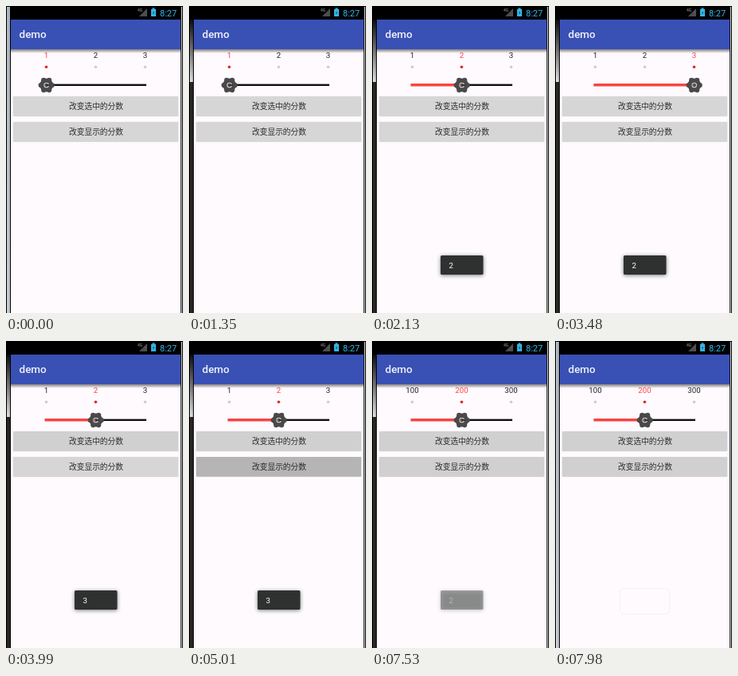
An HTML page with a canvas that plays this animation: 222 px wide and 384 px high, repeating every 8040 ms.

```html
<!DOCTYPE html>
<html lang="zh">
<head>
<meta charset="utf-8">
<title>demo</title>
<style>
html, body { margin: 0; width: 100%; height: 100%; overflow: hidden; background: #000; }
canvas { display: block; width: 222px; height: 384px; }
</style>
</head>
<body>
<canvas></canvas>
<script>
const LOOP = 8040, STEP = 30;
const STOPS = [50.5, 112.5, 174.5];
const RED = '#fa4444';
const LATIN = 'Roboto, sans-serif';
const CJK = '"Noto Sans CJK SC", "Noto Sans CJK", sans-serif';

const canvas = document.querySelector('canvas');
const ctx = canvas.getContext('2d');
const ratio = window.devicePixelRatio || 1;
canvas.width = 222 * ratio;
canvas.height = 384 * ratio;
ctx.scale(ratio, ratio);

const between = (t, a, b) => t >= a && t < b;
const progress = (t, a, b) => Math.min(1, Math.max(0, (t - a) / (b - a)));
const smooth = p => p * p * (3 - 2 * p);

function rect(x, y, w, h, color) {
  ctx.fillStyle = color;
  ctx.fillRect(x, y, w, h);
}

function fade(x, y, w, h, top, bottom) {
  const gradient = ctx.createLinearGradient(0, y, 0, y + h);
  gradient.addColorStop(0, top);
  gradient.addColorStop(1, bottom);
  rect(x, y, w, h, gradient);
}

function disc(x, y, r, color) {
  ctx.fillStyle = color;
  ctx.beginPath();
  ctx.arc(x, y, r, 0, Math.PI * 2);
  ctx.fill();
}

function rounded(x, y, w, h, r) {
  ctx.beginPath();
  ctx.roundRect(x, y, w, h, r);
}

function text(str, x, y, font, color, align = 'center') {
  ctx.font = font;
  ctx.fillStyle = color;
  ctx.textAlign = align;
  ctx.fillText(str, x, y);
}

function polygon(points, color) {
  ctx.fillStyle = color;
  ctx.beginPath();
  points.forEach(([x, y]) => ctx.lineTo(x, y));
  ctx.fill();
}

function drawStatusBar(t) {
  rect(5, 1, 215, 16, '#000');
  polygon([[177, 3], [177, 13], [167, 13]], '#4c4c4c');
  text('4G', 165, 7, `5px ${LATIN}`, '#a5a5a5', 'left');
  if (between(t, 120, 750) || t >= 3480) rect(174, 7, 2, 2, '#585858');
  rect(183.5, 2.5, 3, 1.5, '#33b5e5');
  rect(182, 4, 6, 9, '#33b5e5');
  polygon([[185.5, 6], [183.8, 9], [184.8, 9], [184.5, 11], [186.4, 8], [185.3, 8]], '#165468');
  text('8:27', 193, 12.5, `11px ${LATIN}`, '#33b5e5', 'left');
}

function drawAppBar() {
  fade(5, 54, 215, 5, 'rgba(0,0,0,.5)', 'rgba(0,0,0,0)');
  rect(5, 17, 215, 37, '#3950b4');
  text('demo', 16.5, 40, `500 13.5px ${LATIN}`, '#f0f1fa', 'left');
}

function drawEdges(t) {
  rect(0, 0, 222, 1, '#000');
  rect(0, 1, 6, 383, '#000');
  if (between(t, 1350, 7980)) {
    fade(1, 17, 4, 78, '#0c0c0c', '#dcdcdc');
    rect(1, 95, 4, 289, '#2a2624');
  } else {
    fade(1, 1, 4, 383, '#abb3bc', '#c3c9d1');
  }
  rect(219, 1, 1, 383, '#111');
  rect(220, 1, 1, 383, '#dedee2');
  rect(221, 0, 1, 384, '#000');
}

function knobPosition(t) {
  if (t >= 3690) return 1;
  return smooth(progress(t, 1350, 1740)) + smooth(progress(t, 2370, 2730));
}

function drawKnob(x) {
  const y = 99;
  disc(x, y, 8.4, '#494949');
  for (let i = 0; i < 6; i++) {
    const a = i * Math.PI / 3;
    disc(x + 7 * Math.cos(a), y + 7 * Math.sin(a), 3.1, '#494949');
  }
  ctx.lineWidth = 1.1;
  ctx.strokeStyle = '#d4d0d2';
  ctx.beginPath();
  ctx.arc(x, y, 2.8, 0, Math.PI * 2);
  ctx.stroke();
  if (x > 55) rect(x - 2.3, 98, 2.3, 2, '#b84a4a');
  if (x < 172) rect(x, 98, 4, 2, '#333');
}

function drawSlider(t) {
  const position = knobPosition(t);
  const selected = Math.round(position);
  const x = 50.7 + position * 62;
  STOPS.forEach((stop, i) => {
    const on = i === selected;
    const label = (i + 1) * (t >= 5100 ? 100 : 1);
    text(label, stop, 65, `9.7px ${LATIN}`, on ? RED : '#222');
    disc(stop, 76.3, 1.8, on ? '#dc2626' : '#cfcbcf');
  });
  rect(50, 97.6, 126, 2.4, '#111');
  if (position > 0.01) rect(48.5, 97, x - 48.5, 3.5, RED);
  drawKnob(x);
}

function drawButton(label, y, color) {
  ctx.save();
  ctx.shadowColor = 'rgba(0,0,0,.16)';
  ctx.shadowBlur = ratio;
  ctx.shadowOffsetY = 0.5 * ratio;
  ctx.fillStyle = color;
  rounded(9, y, 207, 24.5, 1);
  ctx.fill();
  ctx.restore();
  text(label, 113, y + 16, `9.75px ${CJK}`, '#2c2c2c');
}

function drawButtons(t) {
  const color = (down, up) => t < down ? '#d6d6d6' : t < up ? '#b5b5b5' : '#d0d0d0';
  drawButton('改变选中的分数', 113, color(3600, 3690));
  drawButton('改变显示的分数', 145, color(5010, 5100));
}

function drawToast(t, label, start, end) {
  const enter = 1 - (1 - progress(t, start, start + 390)) ** 2;
  const leave = 1 - progress(t, end, end + 390) ** 2;
  const alpha = enter * leave;
  if (alpha <= 0) return;
  ctx.save();
  ctx.globalAlpha = alpha;
  ctx.shadowColor = 'rgba(20,40,30,.6)';
  ctx.shadowBlur = 5 * ratio;
  ctx.shadowOffsetY = ratio;
  ctx.fillStyle = '#2f3030';
  rounded(86, 312, 53.5, 24, 1.5);
  ctx.fill();
  ctx.shadowColor = 'transparent';
  text(label, 96.5, 328, `9.7px ${LATIN}`, '#fff', 'left');
  ctx.restore();
}

function drawToasts(t) {
  if (t >= 7620) {
    ctx.lineWidth = 1;
    ctx.strokeStyle = '#f4f1f7';
    rounded(81.5, 309.5, 62, 32, 5);
    ctx.stroke();
  }
  drawToast(t, '2', 1740, 3600);
  drawToast(t, '3', 3600, 5400);
  drawToast(t, '2', 5400, 7230);
}

function draw(t) {
  rect(0, 0, 222, 384, '#fefafe');
  drawSlider(t);
  drawButtons(t);
  drawToasts(t);
  drawAppBar();
  drawStatusBar(t);
  drawEdges(t);
}

const origin = performance.now();
function tick() {
  const t = (performance.now() - origin) % LOOP;
  draw(Math.floor(t / STEP) * STEP);
  requestAnimationFrame(tick);
}
tick();
</script>
</body>
</html>
```
